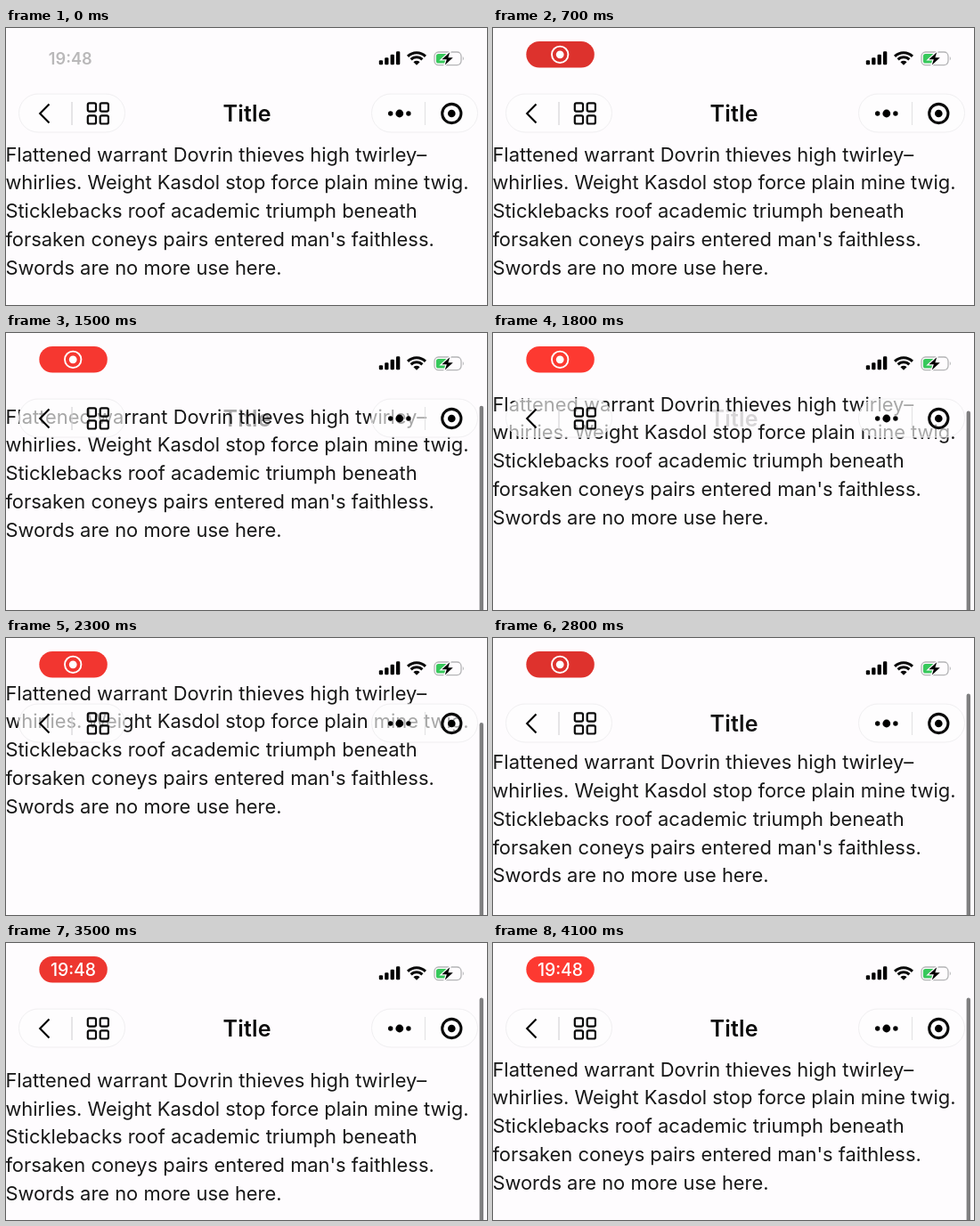
An HTML page for the animation above (4.2 s loop, 540 by 311 pixels).

```html
<!DOCTYPE html>
<html lang="en">
<head>
<meta charset="utf-8">
<title>Fading title bar</title>
<style>
  html, body { margin: 0; width: 100%; height: 100%; overflow: hidden; background: #fefcfe; }
  svg { display: block; width: 540px; height: 311px; }
  text { font-family: Inter, "Noto Sans", sans-serif; }
  #body text { font-size: 21.9px; fill: #181818; }
  #title { font-size: 25px; font-weight: 600; letter-spacing: .2px; fill: #0c0c0c; }
  .clock { font-size: 18.2px; font-weight: 600; text-anchor: middle; }
  .line { fill: none; stroke: #0a0a0a; }
  .capsule { fill: #fff; fill-opacity: .62; stroke: #f0eff1; }
  .divider { stroke: #d4d4d6; stroke-width: 1.2; }
</style>
</head>
<body>
<svg viewBox="0 0 540 311">
  <g id="body"></g>
  <text id="title" x="270.7" y="105.3" text-anchor="middle">Title</text>

  <g id="back">
    <rect class="capsule" x="14.5" y="74" width="119" height="43" rx="21.5"/>
    <path class="divider" d="M74 83V109"/>
    <path class="line" d="M48.5 85.5L38.2 96L48.5 106.5" stroke-width="2.2"/>
    <g id="grid" class="line" stroke-width="2.2"></g>
  </g>
  <g id="menu">
    <rect class="capsule" x="410.5" y="74" width="119" height="43" rx="21.5"/>
    <path class="divider" d="M470.5 83V109" opacity=".6"/>
    <circle cx="431.7" cy="96" r="2.7"/>
    <circle cx="441.8" cy="96" r="4.4"/>
    <circle cx="451.9" cy="96" r="2.7"/>
    <circle class="line" cx="500.3" cy="96" r="10.6" stroke-width="3.1"/>
    <circle cx="500.3" cy="96" r="4.3"/>
  </g>

  <g id="signal"></g>
  <g id="wifi" class="line" stroke-width="3"></g>
  <g id="battery">
    <rect x="481" y="27" width="30" height="14.6" rx="4.6" fill="none" stroke="#b4b4b6" stroke-width="1.3"/>
    <path d="M512.8 32q2.2 2.2 0 4.6z" fill="#b4b4b6"/>
    <path d="M497 29H485.5a2.6 2.6 0 0 0-2.6 2.6v5.4a2.6 2.6 0 0 0 2.6 2.6H497z" fill="#37c85b"/>
    <path d="M498.2 27.2L489.4 35.2H494.8L492.8 41.4L501.8 33.2H496.4z"
          stroke="#fefcfe" stroke-width="2.4" paint-order="stroke"/>
  </g>

  <text id="idleClock" class="clock" x="72.3" y="40.6" fill="#0c0c0c">19:48</text>
  <g id="recorder">
    <rect id="pill" x="37.3" y="15" width="76.5" height="29.6" rx="14.8"/>
    <g id="record" fill="#fff">
      <circle r="9.2" fill="none" stroke="#fff" stroke-width="1.9"/>
      <circle r="4.4"/>
    </g>
    <text id="pillClock" class="clock" x="75.5" y="36.7" fill="#fff" style="font-size:19.4px;font-weight:500">19:48</text>
  </g>
  <rect id="scrollbar" x="531.6" width="4.4" height="400" rx="2.2" fill="#7f7f80"/>
</svg>
<script>
const LOOP = 4200, STEP = 100;
const $ = id => document.getElementById(id);
const clamp = x => Math.min(1, Math.max(0, x));
const ramp = (t, from, to) => clamp((t - from) / (to - from));

const lines = [
  "Flattened warrant Dovrin thieves high twirley–",
  "whirlies. Weight Kasdol stop force plain mine twig.",
  "Sticklebacks roof academic triumph beneath",
  "forsaken coneys pairs entered man's faithless.",
  "Swords are no more use here."
];
$("body").innerHTML = lines.map((s, i) => `<text x="-.6" y="${149.6 + i * 31.8}">${s}</text>`).join("");

$("grid").innerHTML = [0, 1, 2, 3].map(i =>
  `<rect x="${91.8 + i % 2 * 13.9}" y="${84.4 + (i >> 1) * 13.9}" width="9.2" height="9.2" rx="1.8"/>`).join("");

$("signal").innerHTML = [5, 8, 11.5, 15].map((h, i) =>
  `<rect x="${418.8 + i * 6.4}" y="${41.3 - h}" width="4.3" height="${h}" rx="1.2"/>`).join("");

const fan = r => `M${461 - r * .71} ${41.8 - r * .71}A${r} ${r} 0 0 1 ${461 + r * .71} ${41.8 - r * .71}`;
$("wifi").innerHTML = `<path d="${fan(14)}"/><path d="${fan(9)}"/>
  <path d="${fan(5)}L461 41.8z" fill="#0a0a0a" stroke="none"/>`;

// Scroll offset over time: drag up, pull back past the top, spring home.
const drag = [
  [0, 0], [900, 0], [1200, 13], [1500, 48], [1800, 62], [2300, 80], [2450, 72],
  [2800, 2.5], [3000, -15], [3200, -21.5], [3350, -26], [3600, -1], [3750, 0], [LOOP, 0]
];
const slope = i => {
  if (!drag[i - 1] || !drag[i + 1]) return 0;
  const [[t0, a], [t1, b], [t2, c]] = drag.slice(i - 1, i + 2);
  return (b - a) * (c - b) <= 0 ? 0 : (c - a) / (t2 - t0);
};
function scrollAt(t) {
  const i = drag.findIndex(p => p[0] > t) - 1;
  const [t0, a] = drag[i], [t1, b] = drag[i + 1];
  const d = t1 - t0, u = (t - t0) / d, v = 1 - u;
  return a * v * v * (1 + 2 * u) + b * u * u * (3 - 2 * u)
       + d * u * v * (slope(i) * v - slope(i + 1) * u);
}

function draw(t) {
  const scroll = scrollAt(t);
  $("body").setAttribute("transform", `translate(0 ${-scroll})`);
  $("title").setAttribute("opacity", clamp(1 - scroll / 74));
  $("scrollbar").setAttribute("y", 61.5 + .42 * Math.max(0, scroll));
  $("scrollbar").setAttribute("opacity", ramp(t, 850, 1050));

  const glow = .5 - .5 * Math.cos((t - 750) / 2200 * 2 * Math.PI);
  $("pill").setAttribute("fill", `rgb(${221 + 32 * glow},${50 + 7 * glow},${45 + 4 * glow})`);
  $("idleClock").setAttribute("opacity", .28 * (1 - ramp(t, 0, 200)));
  $("recorder").setAttribute("opacity", ramp(t, 50, 400));

  const swap = ramp(t, 3050, 3270);
  $("record").setAttribute("opacity", 1 - swap);
  $("record").setAttribute("transform", `translate(75.2 29.8) scale(${1 - .15 * swap})`);
  $("pillClock").setAttribute("opacity", swap);
}

const start = performance.now();
(function tick() {
  const t = (performance.now() - start) % LOOP;
  draw(Math.floor(t / STEP) * STEP);
  requestAnimationFrame(tick);
})();
</script>
</body>
</html>
```
